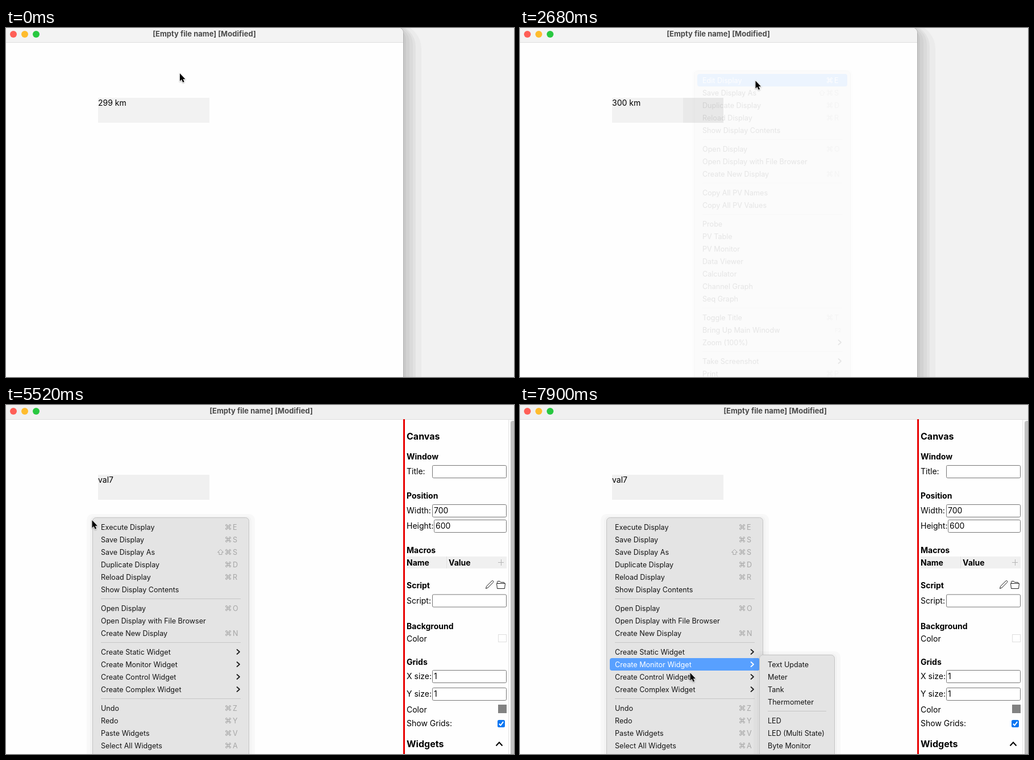
An HTML page for the animation above (8000 ms loop, 894 px wide and 615 px high).

```html
<!DOCTYPE html>
<html lang="en">
<head>
<meta charset="utf-8">
<title>Display editor</title>
<style>
  html, body { margin: 0; width: 100%; height: 100%; overflow: hidden; background: #fefefe; }
  svg { display: block; width: 894px; height: 615px; }
  text { font: 14px Inter, sans-serif; white-space: pre; }
  .b { font-weight: 700; }
  .h { font-size: 16px; font-weight: 700; }
  .title { font-size: 13px; font-weight: 700; fill: #4a4a4a; text-anchor: middle; }
  .menu text { font-size: 12.6px; fill: #151515; }
  .menu .key { fill: #a6a6a6; }
  .menu .fn { font-size: 9.5px; }
  .menu .mark { fill: none; stroke: #a6a6a6; stroke-width: 1; }
  .menu .arrow { fill: none; stroke: #1c1c1c; stroke-width: 1.7; stroke-linecap: round; stroke-linejoin: round; }
  .menu .hit { fill: none; }
  .menu .on .hit { fill: #58a0ff; }
  .menu .on text { fill: #fff; }
  .menu .on .mark, .menu .on .arrow { stroke: #fff; }
  .field { fill: #fff; stroke: #767676; }
  .line { fill: none; stroke: #222; }
</style>
</head>
<body>
<svg id="stage" viewBox="0 0 894 615">
  <g id="runView">
    <rect width="894" height="615" fill="#f2f2f2"/>
    <g id="shade"></g>
    <rect x="-20" y="-1.5" width="719.5" height="640" rx="10" fill="#fefefe" stroke="#acacac"/>
    <path d="M0 0H690Q699 0 699 9V25H0Z" fill="#f3f3f3"/>
    <path d="M0 25.5H699" stroke="#dedede"/>
  </g>
  <g id="editView">
    <rect width="894" height="615" fill="#fefefe"/>
    <rect width="894" height="25" fill="#f0f0f0"/>
    <path d="M0 25.5H894" stroke="#dedede"/>
    <rect x="699" y="25" width="3" height="590" fill="#e80000"/>
    <rect x="884" y="26" width="10" height="589" fill="#fafafa"/>
    <path d="M884.5 26V615" stroke="#e6e6e6"/>
    <rect x="888" y="28" width="12" height="620" rx="4" fill="#c1c1c1"/>
    <rect x="705" y="267" width="176" height="21" fill="#f0f0f0"/>
    <path d="M775.5 267V288" stroke="#e2e2e2"/>
    <path d="M866 277.5H876M871.5 272V283" stroke="#b5b5b5"/>
    <path class="line" d="M844.5 323.5L845.5 319.5L855 310Q856.5 309 857.5 310.2Q858.4 311.3 857.5 312.4L848 322Z"/>
    <path class="line" d="M864.5 314V311.5Q864.5 310.5 865.5 310.5H869L870.5 312.5H876Q877 312.5 877 314M863.5 314.5H878.5L877.5 323.5H864.5Z"/>
    <rect x="866.5" y="404.5" width="14" height="13" fill="#fff" stroke="#dedede"/>
    <rect x="866" y="528" width="15" height="15" fill="#828282"/>
    <rect x="865" y="555" width="13" height="13" rx="2.5" fill="#0b76f2"/>
    <path d="M867.8 561.8L870.4 564.5L875.2 558.2" fill="none" stroke="#fff" stroke-width="2"/>
    <path d="M862.5 600.5L868 594.5L873.5 600.5" fill="none" stroke="#000" stroke-width="2"/>
  </g>
  <g>
    <circle cx="13" cy="11" r="6" fill="#ff5f57"/>
    <circle cx="33" cy="11" r="6" fill="#febc2e"/>
    <circle cx="53" cy="11" r="6" fill="#28c840"/>
    <text id="title" class="title" y="15.2">[Empty file name] [Modified]</text>
    <rect id="box" x="162" y="123" width="196" height="44"/>
    <rect id="dim" x="287" y="123" width="71" height="44" opacity=".035"/>
    <text id="value" x="162" y="136.6"></text>
  </g>
  <g id="menus"></g>
  <path id="cursor" d="M0 0V13.6L3 10.8L5.3 15.8L7.6 14.8L5.4 9.9H9.4Z" stroke="#fff" stroke-width="1.3"
    paint-order="stroke" style="filter:drop-shadow(0 1px 1px rgba(0,0,0,.35))"/>
</svg>
<script>
const $ = id => document.getElementById(id);

function add(parent, tag, attrs, text) {
  const el = document.createElementNS('http://www.w3.org/2000/svg', tag);
  for (const k in attrs) el.setAttribute(k, attrs[k]);
  if (text) el.textContent = text;
  parent.append(el);
  return el;
}
const show = (el, on) => { el.style.display = on ? '' : 'none'; };

// Banded window shadow
[[731, '#ebebeb'], [721, '#e2e2e2'], [716, '#dadada'], [710, '#d2d2d2'], [704, '#c9c9c9']].forEach(([right, fill], i) =>
  add($('shade'), 'rect', { x: -100, y: i * 2 - 8, width: right + 100, height: 720, rx: 45 - i * 6, fill }));

// Property panel
const label = (y, text, cls = '', x = 705) => add($('editView'), 'text', { x, y, class: cls }, text);
function field(y, name, value, x = 750) {
  label(y + 16.2, name);
  add($('editView'), 'rect', { class: 'field', x: x + .5, y: y + .5, width: 880 - x, height: 22, rx: 2 });
  if (value) label(y + 16.2, value, '', x + 3);
}
label(60.5, 'Canvas', 'h');
label(603.3, 'Widgets', 'h');
[[96.4, 'Window'], [165.4, 'Position'], [261.4, 'Macros'], [282.8, 'Name'], [323, 'Script'],
 [395, 'Background'], [457.6, 'Grids']].forEach(([y, s]) => label(y, s, 'b'));
label(282.8, 'Value', 'b', 779);
[[417.4, 'Color'], [542, 'Color'], [566, 'Show Grids:']].forEach(([y, s]) => label(y, s));
field(106, 'Title:');
field(175, 'Width:', '700');
field(202, 'Height:', '600', 753);
field(333.5, 'Script:');
field(467, 'X size:', '1');
field(498, 'Y size:', '1');

// Menus: "Label|key"; "^" adds shift, ">" opens a submenu, "-" is a divider
const CMD = 'M3.5 2V8A1.5 1.5 0 1 1 2 6.5H8A1.5 1.5 0 1 1 6.5 8V2A1.5 1.5 0 1 1 8 3.5H2A1.5 1.5 0 1 1 3.5 2Z';
const SHIFT = 'M5.5 .5L10.5 5.5H8V9.5H3V5.5H.5Z';

function menu(x, y, w, list) {
  const g = add($('menus'), 'g', { class: 'menu' });
  add(g, 'rect', { x: x - 10, y: y - 6, width: w + 20, height: 700, rx: 10, opacity: .022 });
  add(g, 'rect', { x: x - 4, y: y - 2, width: w + 8, height: 700, rx: 8, opacity: .02 });
  add(g, 'rect', { x: x + .5, y: y + .5, width: w - 1, height: 700, rx: 6, fill: '#e4e4e4', stroke: '#c3c3c3' });
  const rows = [];
  let top = y + 6;
  for (const item of list.split(',')) {
    if (item === '-') {
      add(g, 'path', { d: `M${x + 15} ${top + 5.5}H${x + w - 15}`, stroke: '#c6c6c6' });
      top += 11;
      continue;
    }
    const [name, key = ''] = item.split('|');
    const row = add(g, 'g', {});
    const mid = top + 11;
    add(row, 'rect', { class: 'hit', x: x + 6, y: top, width: w - 12, height: 22, rx: 4 });
    add(row, 'text', { x: x + 15, y: mid + 4.7 }, name);
    if (key === '>') {
      add(row, 'path', { class: 'arrow', d: `M${x + 254.5} ${mid - 4}l4.5 4l-4.5 4` });
    } else if (key === 'F2') {
      add(row, 'text', { class: 'key fn', x: x + 248, y: mid + 4.3 }, key);
    } else if (key) {
      const glyph = (d, dx) => add(row, 'path', { class: 'mark', d, transform: `translate(${x + dx} ${mid - 5})` });
      glyph(CMD, 234);
      if (key[0] === '^') glyph(SHIFT, 220);
      add(row, 'text', { class: 'key', x: x + 247, y: mid + 4.7 }, key.slice(-1));
    }
    rows.push({ row, name, top });
    top += 22;
  }
  return {
    g,
    pick: test => rows.forEach(r => r.row.classList.toggle('on', test(r)))
  };
}

const runMenu = menu(306, 75, 276, 'Edit Display|E,Save Display As|^S,Duplicate Display|D,Reload Display|R,' +
  'Show Display Contents,-,Open Display|O,Open Display with File Browser,Create New Display|N,-,' +
  'Copy All PV Names,Copy All PV Values,-,Probe,PV Table,PV Monitor,Data Viewer,Calculator,Channel Graph,' +
  'Seq Graph,-,Toggle Title|T,Bring Up Main Winodw|F2,Zoom (100%)|>,-,Take Screenshot|>,Print|P');
const editMenu = menu(152, 198, 276, 'Execute Display|E,Save Display|S,Save Display As|^S,Duplicate Display|D,' +
  'Reload Display|R,Show Display Contents,-,Open Display|O,Open Display with File Browser,Create New Display|N,-,' +
  'Create Static Widget|>,Create Monitor Widget|>,Create Control Widget|>,Create Complex Widget|>,-,' +
  'Undo|Z,Redo|Y,Paste Widgets|V,Select All Widgets|A');
const subMenu = menu(421, 440, 133, 'Text Update,Meter,Tank,Thermometer,-,LED,LED (Multi State),Byte Monitor');

// Pointer positions: time, x, y
const path = [
  [0, 306, 80],
  [750, 312, 81], [900, 338, 84], [1050, 372, 88], [1200, 398, 91], [1340, 410, 92.5], [1480, 414.5, 93],
  [3880, 408, 98], [4030, 370, 128], [4180, 296, 176], [4330, 234.5, 204], [4480, 204, 211], [4630, 184, 209], [4780, 174, 206],
  [4930, 164, 204], [5080, 155, 203], [5220, 151.5, 203],
  [5970, 156, 212], [6120, 168, 246], [6270, 186, 306], [6420, 203, 372], [6560, 213, 418], [6710, 217.5, 435],
  [6860, 230, 447], [7010, 250, 454],
  [7150, 266, 456], [7300, 276, 458],
  [7600, 284, 463], [7750, 294, 469], [7900, 299.5, 472]
];

function draw(t) {
  const [, x, y] = path.findLast(p => p[0] <= t);
  const edit = t >= 2830;
  const runOpen = t >= 150 && !edit;
  show($('runView'), !edit);
  show($('editView'), edit);
  $('title').setAttribute('x', edit ? 449 : 349);
  $('box').setAttribute('fill', edit ? '#f0f0f0' : '#f2f2f2');
  $('value').textContent = edit ? 'val7' : t < 1050 ? '299 km' : '300 km';
  show($('dim'), runOpen);
  show(runMenu.g, runOpen);
  runMenu.g.setAttribute('opacity', t >= 2680 ? .1 : 1);
  show(editMenu.g, t >= 5520);
  show(subMenu.g, t >= 7150);

  const under = r => y >= r.top && y < r.top + 22;
  runMenu.pick(r => t >= 750 && under(r));
  editMenu.pick(r => t >= 7010 ? r.name === 'Create Monitor Widget' : t >= 5970 && under(r));
  $('cursor').setAttribute('transform', `translate(${x} ${y})`);
}

function tick() {
  draw(performance.now() % 8000);
  requestAnimationFrame(tick);
}
tick();
</script>
</body>
</html>
```
